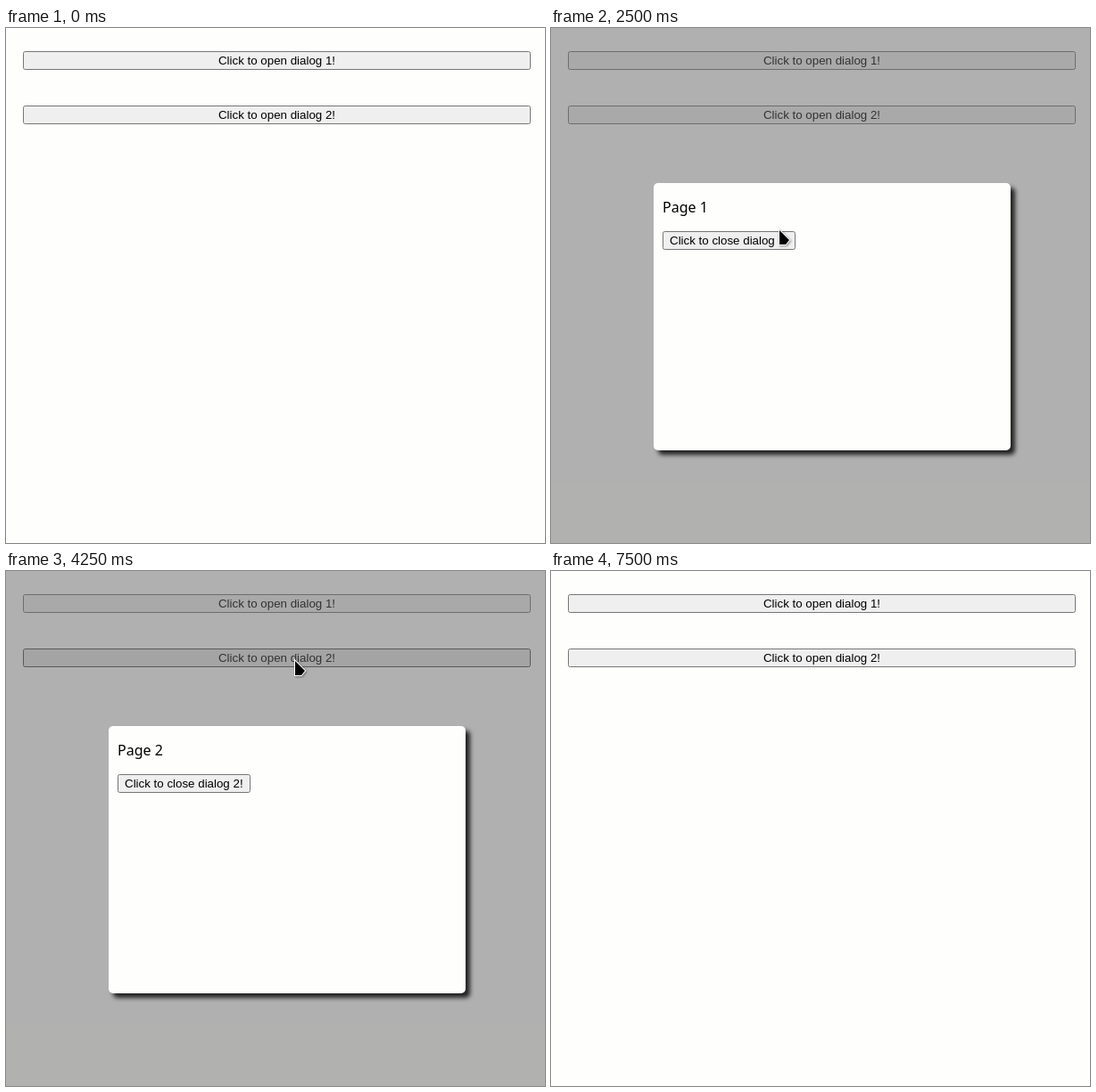
These frames come from a looping animation (604 px wide and 578 px high, 8.83 s). An HTML page:

```html
<!DOCTYPE html>
<html lang="en">
<head>
<meta charset="utf-8">
<title>Two dialogs</title>
<style>
  html, body { margin: 0; width: 100%; height: 100%; overflow: hidden; background: #fefefd; }
  body * { position: absolute; box-sizing: border-box; }
  .btn {
    height: 21px; padding: 0 7px; border: 1px solid #767676; border-radius: 2.5px;
    background: #efefef; color: #000; text-align: center; white-space: nowrap;
    font: 13.333px/19px "Liberation Sans", Arial, sans-serif;
  }
  .hover { background: #e5e5e5; border-color: #4f4f4f; }
  .pressed { background: #f5f5f5; border-color: #8d8d8d; }
  .open { left: 19px; width: 569px; }
  #open1 { top: 26px; }
  #open2 { top: 87px; }
  #shade { inset: 0; background: rgba(100, 100, 100, .5); }
  #dialog {
    left: 115px; top: 174px; width: 400px; height: 300px; border-radius: 5px;
    background: #fefefd; box-shadow: 5px 5px 5px #222;
  }
  #page { left: 10px; top: 16px; font: 16px/22px "Noto Sans", sans-serif; white-space: nowrap; }
  #close { left: 10px; top: 54px; }
  #cursor { left: 0; top: 0; overflow: visible; filter: drop-shadow(1px 1px 1px rgba(0, 0, 0, .4)); }
  #cursor path { fill: #000; stroke: #fff; stroke-width: 2; paint-order: stroke; }
</style>
</head>
<body>
<div class="btn open" id="open1">Click to open dialog 1!</div>
<div class="btn open" id="open2">Click to open dialog 2!</div>
<div id="shade">
  <div id="dialog">
    <div id="page"></div>
    <div class="btn" id="close"></div>
  </div>
</div>
<svg id="cursor" width="1" height="1">
  <path id="arrow" d="M1 1L12 12L8 17H1Z"/>
  <path id="hand" d="M-2 2Q-2 0 0 0Q2 0 2 2V7Q9 7 11 9V15L10 20H-1V18L-7 11Q-7 8 -4 9L-2 11Z"/>
</svg>
<script>
const LOOP = 8830, STEP = 1000 / 12;
const el = id => document.getElementById(id);
const show = (id, on) => { el(id).style.display = on ? '' : 'none'; };

// Steps at which a click lands; every other one closes the dialog.
const clicks = [13, 34, 51, 70];

// Resting points of the pointer: [step, x, y]. It leaves over the top edge, then looks in briefly.
const visits = [
  [[86, 470, 29], [89, 560, 146]],
  [[1, 470, 198], [12, 373, 28], [19, 364, 130], [33, 247, 233],
   [51, 323, 100], [69, 243, 229], [87, 300, -125]]
];

const ease = u => u * u * u * (10 - 15 * u + 6 * u * u);

function pointerAt(n) {
  const path = visits.find(v => n >= v[0][0] && n <= v[v.length - 1][0]);
  if (!path) return null;
  const i = Math.max(1, path.findIndex(stop => stop[0] >= n));
  const [a, ax, ay] = path[i - 1], [b, bx, by] = path[i];
  const e = ease((n - a) / (b - a));
  const x = Math.round(ax + (bx - ax) * e), y = Math.round(ay + (by - ay) * e);
  return y < 0 ? null : { x, y };
}

function inside(p, id) {
  const r = el(id).getBoundingClientRect();
  return !!p && p.x >= r.left && p.x < r.right && p.y >= r.top && p.y < r.bottom;
}

function draw(now) {
  const n = Math.floor((now % LOOP + 4) / STEP);
  const p = pointerAt(n);
  const done = clicks.filter(c => c <= n).length;
  const open = done % 2 === 1;
  const justOpened = open && clicks.includes(n);

  show('shade', open);
  if (open) {
    const number = (done + 1) / 2;
    el('page').textContent = 'Page ' + number;
    el('close').textContent = `Click to close dialog ${number}!`;
  }
  for (const id of ['open1', 'open2', 'close']) {
    // Hover lingers on an opener until the pointer moves again.
    const over = inside(p, id) && (id === 'close' || !open || justOpened);
    el(id).classList.toggle('hover', over);
    el(id).classList.toggle('pressed', over && clicks.includes(n + 1));
  }

  const hand = open && !justOpened && !inside(p, 'dialog');
  show('cursor', p);
  show('hand', hand);
  show('arrow', !hand);
  if (p) el('cursor').style.transform = `translate(${p.x}px, ${p.y}px)`;
}

const start = performance.now();
(function tick() {
  draw(performance.now() - start);
  requestAnimationFrame(tick);
})();
</script>
</body>
</html>
```
